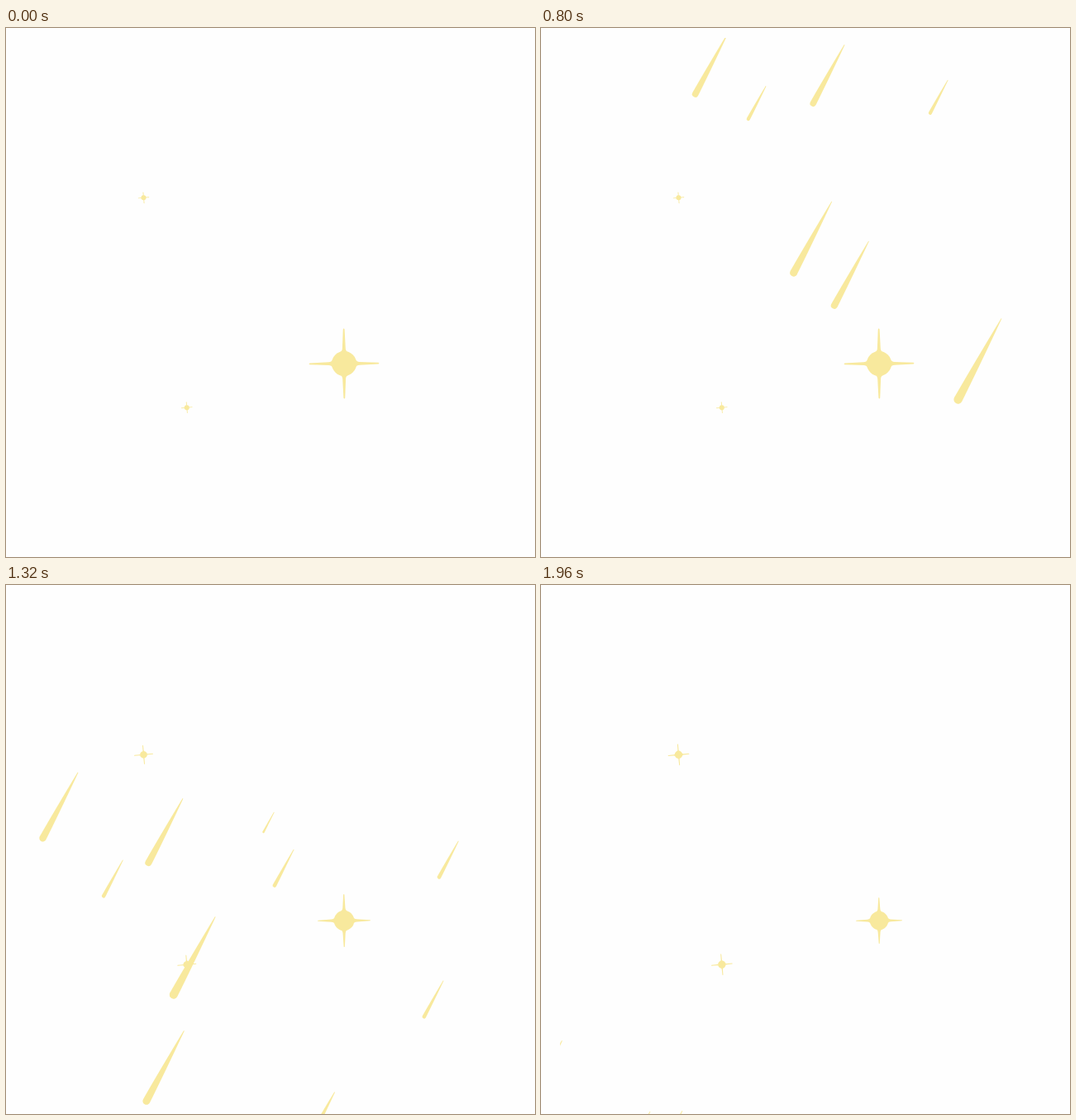
Animation, 640 px wide and 640 px high, one loop 2000 ms. Source, as an HTML page with a canvas:

```html
<!DOCTYPE html>
<html>
<head>
<meta charset="utf-8">
<style>
html, body { margin: 0; width: 100%; height: 100%; overflow: hidden; background: #fefefe; }
canvas { display: block; }
</style>
</head>
<body>
<canvas id="sky" width="640" height="640"></canvas>
<script>
const ctx = document.getElementById('sky').getContext('2d');
const LOOP = 2000, STEP = 40;
const FROM = 960, TO = 1640; // times of the two key points on each path
const LEAN = 0.535;          // sideways shift of a tail per unit of height

// Straight paths as two key points, x y to x y, grouped by depth
const near = [
  [454, 533, 239, 888], [274, 357.5, 139.5, 618.5], [298, 424.5, 56, 802],
  [143, 149.5, -43, 445.5], [281, 166.5, 76, 486.5]
];
const mid = [
  [210, 192, 36.5, 540], [426, 183, 235, 524],
  [694, 153, 373, 531.5], [629.5, 347, 396, 678]
];
const far = [[464, 81, 176, 492.5]];

const lerp = (a, b, k) => a + (b - a) * k;

function meteor([x0, y0, x1, y1], height, t) {
  const k = (t - FROM) / (TO - FROM);
  const h = height * (1 + 0.12 * k);
  const len = h * Math.hypot(1, LEAN), r = h * 0.053;
  ctx.save();
  ctx.translate(lerp(x0, x1, k), lerp(y0, y1, k));
  ctx.rotate(Math.atan(LEAN));
  ctx.beginPath();
  ctx.arc(0, 0, r, 0, Math.PI);
  ctx.quadraticCurveTo(-r * 0.75, -len * 0.4, -0.4, -len);
  ctx.lineTo(0.4, -len);
  ctx.quadraticCurveTo(r * 0.75, -len * 0.4, r, 0);
  ctx.fill();
  ctx.restore();
}

// Round core with four thin arms that flare where they meet it
function star(x, y, core, reach, tip, angle) {
  const w = core * 0.13;
  ctx.save();
  ctx.translate(x, y);
  ctx.rotate(angle);
  ctx.beginPath();
  ctx.arc(0, 0, core, 0, Math.PI * 2);
  ctx.fill();
  for (let i = 0; i < 4; i++) {
    ctx.beginPath();
    ctx.moveTo(-core * 0.32, -core * 0.94);
    ctx.quadraticCurveTo(-w, -core, -w, -core * 1.25);
    ctx.lineTo(-tip, -reach + tip);
    ctx.quadraticCurveTo(0, -reach - tip, tip, -reach + tip);
    ctx.lineTo(w, -core * 1.25);
    ctx.quadraticCurveTo(w, -core, core * 0.32, -core * 0.94);
    ctx.fill();
    ctx.rotate(Math.PI / 2);
  }
  ctx.restore();
}

function draw(t) {
  ctx.fillStyle = '#fefefe';
  ctx.fillRect(0, 0, 640, 640);
  ctx.fillStyle = '#f8e99d';

  // Twinkle: the large star shrinks while the small ones grow
  const d = 1 - Math.abs(1 - (t % 800) / 400);
  const shrink = 16.6 * d ** 1.3;
  star(409, 406, 15 - 0.26 * shrink, 42.5 - shrink, 0.9 - 0.4 * d, -0.008);
  for (const [x, y] of [[166.5, 205.3], [218.8, 459.2]])
    star(x, y, 3 + 1.9 * d, 6.9 + 6.8 * d, 0.5, -0.09);

  ctx.save();
  ctx.beginPath();
  ctx.rect(23, 12, 617, 628);
  ctx.clip();
  near.forEach((path, i) => meteor(path, 73 + 28 * (1 - i / 4) ** 2, t));
  mid.forEach(path => meteor(path, 41, t));
  far.forEach(path => meteor(path, 22.5, t));
  ctx.restore();
}

const start = performance.now();
function tick() {
  const t = (performance.now() - start) % LOOP;
  draw(Math.floor(t / STEP) * STEP);
  requestAnimationFrame(tick);
}
tick();
</script>
</body>
</html>
```
